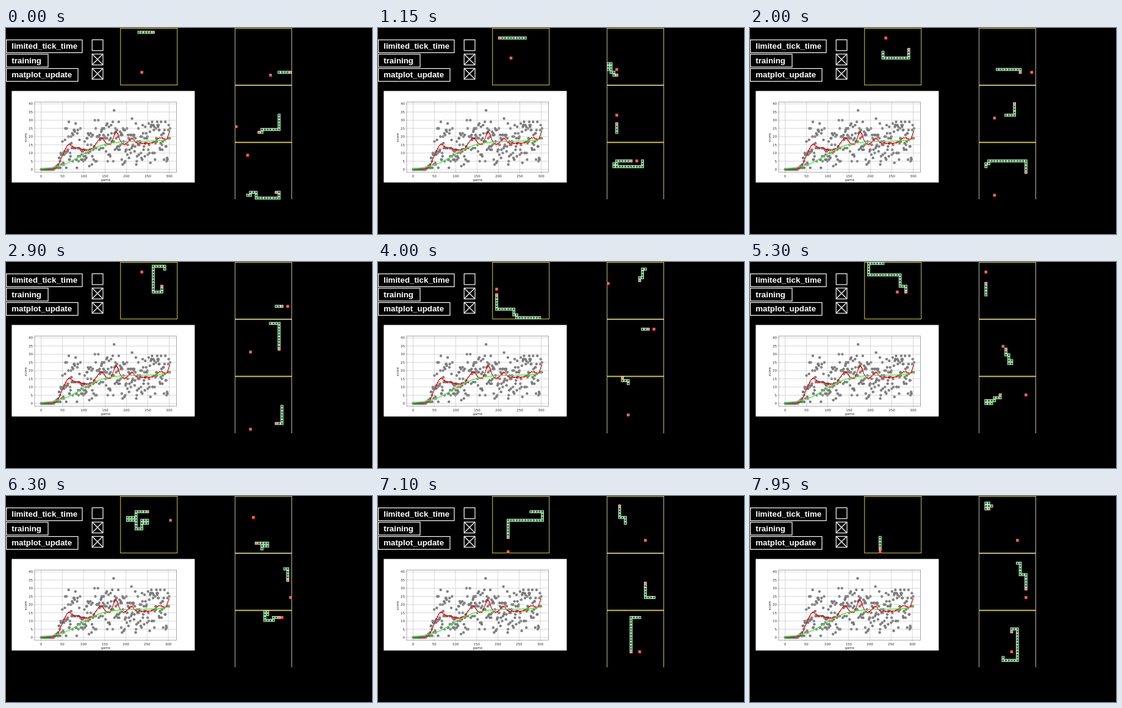
Animation, 600 px wide and 338 px high, one loop 8 s. Source, as an HTML page with a canvas:

```html
<!DOCTYPE html>
<html lang="en">
<head>
<meta charset="utf-8">
<title>Snake training</title>
<style>
html, body { margin: 0; width: 100%; height: 100%; overflow: hidden; background: #000; }
canvas { display: block; }
</style>
</head>
<body>
<canvas id="stage" width="600" height="338"></canvas>
<script>
const ctx = document.getElementById('stage').getContext('2d');
const LOOP = 8000, TICK = 50, CELL = 4.69, BOARD = 20 * CELL;
const REPLOT_TICK = 122, PAUSE_TICKS = 3;
const lerp = (a, b, u) => a + (b - a) * u;

function line(points, color, width = 1) {
  ctx.strokeStyle = color;
  ctx.lineWidth = width;
  ctx.beginPath();
  for (const [x, y] of points) ctx.lineTo(x, y);
  ctx.stroke();
}

function label(text, x, y, align = 'center') {
  ctx.textAlign = align;
  ctx.fillText(text, x, y);
}

// ---------- snakes ----------
// Key poses: food cell, tail cell, then the turns that lead to the head.
const POSE_TICKS = [0, 23, 58, 80, 106, 123, 156];
const BOARDS = [
  { x: 187.5, y: 0, poses: ['7,15 6,1 R5', '6,10 11,3 L9', '7,3 15,2 U L4 D9 R3 U2',
    '1,9 16,19 L8 U L U2 L6 U5', '11,10 6,0 L5 D4 R11 D4 R2 D2',
    '17,8 7,8 R2 D L2 D2 L2 U3 L3 U R3 U2 R4', '5,19 5,14 D4'] },
  { x: 375, y: 0, poses: ['12,16 15,15 R4', '3,14 0,14 U2 R D3 R D R', '18,15 14,15 R2',
    '0,7 13,2 L D3 L D', '2,3 2,11 U4', '6,7 9,18 U R2 U L4', '13,15 4,3 L U L D2 R'] },
  { x: 375, y: BOARD, poses: ['0,14 15,10 D5 L6 D L', '3,10 3,16 U3', '5,11 12,1 R3 D9',
    '16,3 12,3 R2', '8,9 11,14 D L U3 L U2', '19,15 17,5 R D4', '16,15 13,3 R D4 R2 D5'] },
  { x: 375, y: 2 * BOARD, poses: ['4,4 4,18 R U R2 D2 R8 U2 L', '10,6 12,6 D2 L10 U R U R5',
    '5,18 16,10 D6 L2', '7,13 7,2 U L2 U', '16,6 4,9 L2 U R3 U R2 U',
    '16,2 10,0 R D L D2 R3 U R2', '11,14 8,16 D R5 U11 L2 D'] }
];
const STEP = { U: [0, -1], D: [0, 1], L: [-1, 0], R: [1, 0] };

function parsePose(text) {
  const [food, tail, ...turns] = text.split(' ');
  const cell = s => s.split(',').map(Number);
  const body = [cell(tail)];
  for (const turn of turns) {
    const [dx, dy] = STEP[turn[0]];
    for (let n = Number(turn.slice(1) || 1); n--;) {
      const [x, y] = body[body.length - 1];
      body.push([x + dx, y + dy]);
    }
  }
  return { food: cell(food), body };
}

// Cells after `from` up to and including `to`, across first, then along.
function route(from, to) {
  let [x, y] = from;
  const cells = [];
  while (x !== to[0]) cells.push([x += Math.sign(to[0] - x), y]);
  while (y !== to[1]) cells.push([x, y += Math.sign(to[1] - y)]);
  return cells;
}

// A snake eats its food, then runs into the next pose; a shorter next pose means it died.
function snakeAt(poses, tick) {
  let i = poses.length - 2;
  while (i > 0 && POSE_TICKS[i] > tick) i--;
  const a = poses[i], b = poses[i + 1];
  const start = POSE_TICKS[i], end = POSE_TICKS[i + 1], u = (tick - start) / (end - start);
  const sizeA = a.body.length, sizeB = b.body.length;
  const slice = (path, head, size) => path.slice(Math.max(0, head + 1 - size), head + 1);

  const toFood = [...a.body, ...route(a.body[sizeA - 1], a.food)];
  const bridge = [...toFood, ...route(a.food, b.body[0])];
  const died = sizeB < sizeA;

  if (died && u >= 0.5) {
    const path = [[10, 10], ...route([10, 10], b.body[0]), ...b.body.slice(1)];
    const head = Math.max(2, path.length - 1 - 2 * (end - tick));
    const size = Math.round(lerp(3, sizeB, u * 2 - 1));
    return { food: b.food, body: slice(path, head, size) };
  }
  const path = died ? bridge : [...bridge, ...b.body.slice(1)];
  const head = died
    ? Math.min(path.length - 1, sizeA - 1 + 2 * (tick - start))
    : Math.round(lerp(sizeA - 1, path.length - 1, u));
  const size = died ? sizeA : Math.round(lerp(sizeA, sizeB, u));
  const eaten = head >= toFood.length - 1;
  return { food: eaten ? b.food : a.food, body: slice(path, head, size) };
}

for (const board of BOARDS) board.poses = board.poses.map(parsePose);

function drawCell(board, [cx, cy], edge, fill) {
  const x = board.x + cx * CELL, y = board.y + cy * CELL;
  ctx.fillStyle = edge;
  ctx.fillRect(x, y, CELL, CELL);
  ctx.fillStyle = fill;
  ctx.fillRect(x + 0.9, y + 0.9, CELL - 1.8, CELL - 1.8);
}

function drawBoard(board, tick) {
  const { food, body } = snakeAt(board.poses, tick);
  drawCell(board, food, '#f05050', '#ff6c60');
  body.forEach((cell, i) => i === body.length - 1
    ? drawCell(board, cell, '#f8dcd4', '#ff6c60')
    : drawCell(board, cell, '#e2f6e2', '#087a20'));
}

function drawFrames() {
  ctx.strokeStyle = '#d0c838';
  ctx.lineWidth = 1;
  ctx.strokeRect(187.7, 0.5, 93, 93);
  line([[375, 0.5], [469, 0.5]], '#d0c838');
  line([[375.5, 0], [375.5, 281]], '#bcb890');
  line([[468.4, 0], [468.4, 281]], '#d4cc58');
  for (const y of [BOARD, 2 * BOARD]) line([[375, y], [469, y]], '#dcd444', 1.7);
}

// ---------- options ----------
const OPTIONS = [
  { name: 'limited_tick_time', width: 125, on: false },
  { name: 'training', width: 69, on: true },
  { name: 'matplot_update', width: 118, on: true }
];

function drawOption({ name, width, on }, row) {
  const y = 19 + 23.5 * row;
  ctx.strokeStyle = '#fff';
  ctx.lineWidth = 1.2;
  ctx.strokeRect(0.5, y + 0.5, width - 0.5, 21);
  ctx.strokeRect(141.2, y + 0.3, 17.8, 17.8);
  if (on) {
    line([[141, y], [159, y + 18]], '#fff', 1.3);
    line([[159, y], [141, y + 18]], '#fff', 1.3);
  }
  ctx.fillStyle = '#fff';
  ctx.font = 'bold 13.3px "Liberation Sans", Arial, sans-serif';
  label(name, 9.2, y + 15, 'left');
}

// ---------- chart ----------
let seed = 11;
const random = () => (seed = seed * 16807 % 2147483647) / 2147483647;
const logistic = x => 1 / (1 + Math.exp(-x));
const bump = (x, center, height, width) => height * Math.exp(-(((x - center) / width) ** 2));

// Short-term average: a steep start, a slow climb and a few good and bad streaks.
const recentMean = g => logistic((g - 47) / 5) * (12 + 0.016 * g
  + bump(g, 65, 2.5, 9) + bump(g, 108, -2, 18) + bump(g, 140, 5, 12)
  + bump(g, 176, 8, 9) + bump(g, 212, 3.5, 9) + bump(g, 280, 3, 12) + bump(g, 304, 7.5, 7));
const overallMean = g => 17.3 * logistic((g - 95) / 27) + 1.8 * Math.exp((g - 303) / 14);

const games = Array.from({ length: 303 }, (_, game) => game);
const overall = games.map(g => [g, overallMean(g)]);
const recent = games.map(g => {
  const mean = recentMean(g);
  return [g, mean + (random() - 0.5) * Math.min(0.9, mean / 8)];
});
const scores = games.map(g => {
  const mean = recentMean(g);
  const spread = (random() + random() - 1) * Math.min(17, mean * 1.5);
  return [g, Math.max(mean > 9 ? 1 : 0, Math.round(mean + spread))];
});

function drawChart(gameCount) {
  const left = 47, right = 279.7, top = 121.3, bottom = 236.8;
  const px = game => 57.5 + 211.4 * game / gameCount;
  const py = score => 232 - 2.69 * score;
  const plot = ([game, score]) => [px(game), py(score)];

  ctx.fillStyle = '#fff';
  ctx.fillRect(9.4, 103.3, 300, 150.2);

  ctx.fillStyle = '#808080';
  ctx.strokeStyle = '#686868';
  ctx.lineWidth = 0.5;
  for (const point of scores) {
    ctx.beginPath();
    ctx.arc(...plot(point), 1.9, 0, 2 * Math.PI);
    ctx.fill();
    ctx.stroke();
  }

  ctx.fillStyle = '#303030';
  ctx.font = '5.5px "DejaVu Sans", sans-serif';
  for (let game = 0; game <= 300; game += 50) {
    line([[px(game), top], [px(game), bottom + 1.6]], '#b0b0b0', 0.5);
    label(game, px(game), 244.6);
  }
  for (let score = 0; score <= 40; score += 5) {
    line([[left - 1.6, py(score)], [right, py(score)]], '#b0b0b0', 0.5);
    label(score, 44, py(score) + 2, 'right');
  }
  label('game', 163.3, 250.8);
  ctx.save();
  ctx.translate(34, 180);
  ctx.rotate(-Math.PI / 2);
  label('score', 0, 0);
  ctx.restore();

  line(recent.map(plot), '#e00808', 1.2);
  line(overall.map(plot), '#40f040', 1.4);
  ctx.strokeStyle = '#555';
  ctx.lineWidth = 0.5;
  ctx.strokeRect(left, top, right - left, bottom - top);
}

function draw() {
  const clock = Math.floor(performance.now() % LOOP / TICK);
  const replotted = clock >= REPLOT_TICK;
  const tick = replotted ? clock - PAUSE_TICKS : Math.min(clock, REPLOT_TICK - PAUSE_TICKS - 1);
  ctx.fillStyle = '#000';
  ctx.fillRect(0, 0, 600, 338);
  OPTIONS.forEach(drawOption);
  drawChart(replotted ? 304 : 302);
  drawFrames();
  for (const board of BOARDS) drawBoard(board, tick);
  requestAnimationFrame(draw);
}
draw();
</script>
</body>
</html>
```
